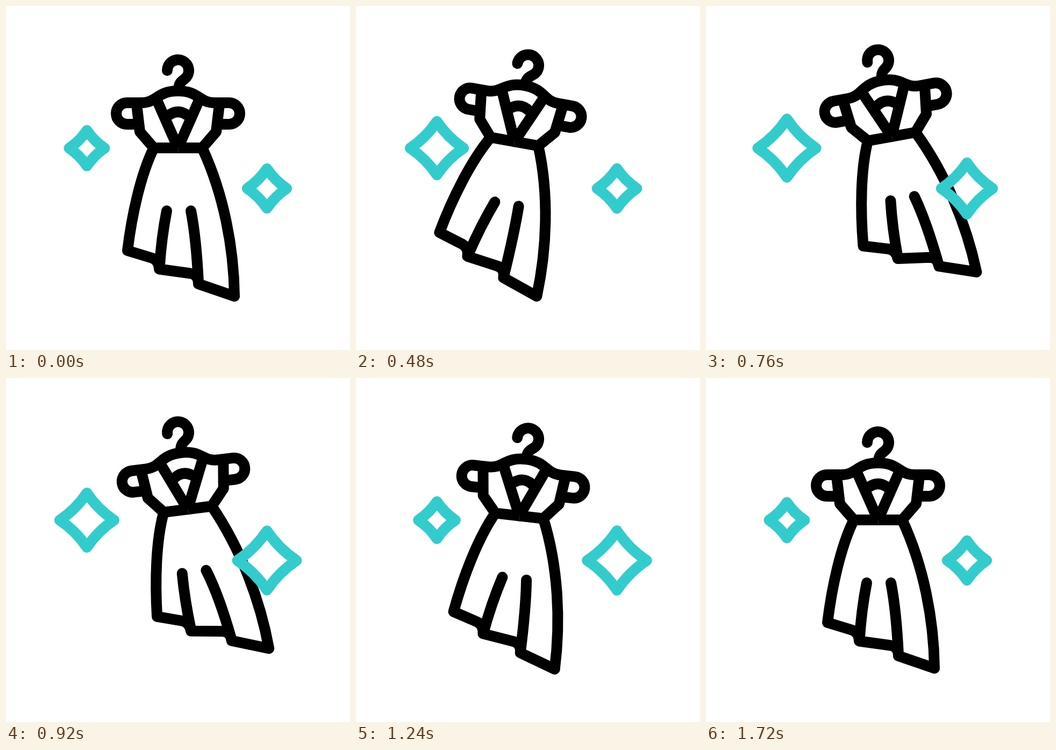
Recreate the animation shown at these times as an HTML page with a canvas. Size 640 px wide and 640 px high, loop 1.84 s.

```html
<!DOCTYPE html>
<html lang="en">
<head>
<meta charset="utf-8">
<title>Dress on a hanger</title>
<style>
  html, body { margin: 0; width: 100%; height: 100%; overflow: hidden; background: #fff; }
  canvas { display: block; width: 640px; height: 640px; }
</style>
</head>
<body>
<canvas id="stage" width="640" height="640"></canvas>
<script>
const ctx = document.getElementById('stage').getContext('2d');
const LOOP = 1840, STEP = 40;
const PIVOT = { x: 320, y: 120 };
const TEAL = '#33cccc';

// Keys are [time, value] pairs, eased in and out between neighbours.
const swingKeys = [[60, 0], [410, 12], [805, -11], [1195, 7], [1460, 0]];
const liftKeys = [[130, 0], [840, -19.5], [1500, 0]];
const stars = [
  { x: 150.5, y: 264.5, keys: [[80, 33], [650, 54.2], [775, 54.2], [1325, 33]] },
  { x: 485.5, y: 339.5, keys: [[440, 36.7], [1060, 57.8], [1120, 57.8], [1680, 36.7]] }
];

function ease(keys, t) {
  if (t <= keys[0][0]) return keys[0][1];
  for (let i = 1; i < keys.length; i++) {
    const [t0, a] = keys[i - 1], [t1, b] = keys[i];
    if (t < t1) {
      const u = (t - t0) / (t1 - t0);
      return a + (b - a) * u * u * (3 - 2 * u);
    }
  }
  return keys[keys.length - 1][1];
}

function stroke(path, color = '#000', width = 20) {
  ctx.strokeStyle = color;
  ctx.lineWidth = width;
  ctx.stroke(new Path2D(path));
}

function drawBodice() {
  stroke('M300 120 A20 20 0 1 1 332 136 C325 141 321 145 321 156');
  stroke('M242 220 H225 A20 20 0 0 1 225 180 H252 C281 180 281 158 320 158' +
         'C359 158 359 180 388 180 H415 A20 20 0 0 1 415 220 H398');
  stroke('M243 183 L249 234 L275 264 H365 L391 234 L397 183');
  stroke('M282 178 L320 264 L358 178');
  stroke('M303 203 Q320 191 337 203');
  stroke('M320.5 264 V274', '#333', 0.8);
}

// The hem trails the swing by `drag`; each path bends between waist and hem.
function drawSkirt(drag) {
  const fold = -0.35 * drag;
  const at = (x, y, shift) => `${x + shift} ${y} `;
  const hem = (x, y) => at(x, y, drag);

  stroke('M275 264 C' + at(250, 315, drag * 0.3) + at(234, 390, drag * 0.7) + hem(226, 455) +
         'L' + hem(272, 469) + 'Q' + hem(285, 474) + hem(285, 489.5) +
         'L' + hem(343, 497.5) + 'Q' + hem(358, 500) + hem(358, 517) +
         'L' + hem(425, 540) +
         'C' + at(424, 450, drag * 0.7) + at(405, 350, drag * 0.3) + '365 264');

  const mid = (fold + drag) / 2;
  stroke('M' + at(299, 381, fold) + 'Q' + at(289, 432, mid) + hem(285.5, 488));
  stroke('M' + at(344, 381, fold) + 'Q' + at(354, 432, mid) + hem(358, 515));
}

function drawStar({ x, y, keys }, t) {
  const r = ease(keys, t), q = r * 0.4;
  ctx.save();
  ctx.translate(x, y);
  stroke(`M0 ${-r} Q${q} ${-q} ${r} 0 Q${q} ${q} 0 ${r} Q${-q} ${q} ${-r} 0 Q${-q} ${-q} 0 ${-r} Z`, TEAL);
  ctx.restore();
}

function render(t) {
  ctx.fillStyle = '#fff';
  ctx.fillRect(0, 0, 640, 640);
  ctx.lineCap = ctx.lineJoin = 'round';

  ctx.save();
  ctx.translate(PIVOT.x, PIVOT.y + ease(liftKeys, t));
  ctx.rotate(ease(swingKeys, t) * Math.PI / 180);
  ctx.translate(-PIVOT.x, -PIVOT.y);
  drawSkirt(-1.15 * ease(swingKeys, t - 85));
  drawBodice();
  ctx.restore();

  stars.forEach(star => drawStar(star, t));
}

const start = performance.now();
function tick() {
  const t = (performance.now() - start) % LOOP;
  render(Math.floor(t / STEP) * STEP);
  requestAnimationFrame(tick);
}
tick();
</script>
</body>
</html>
```
